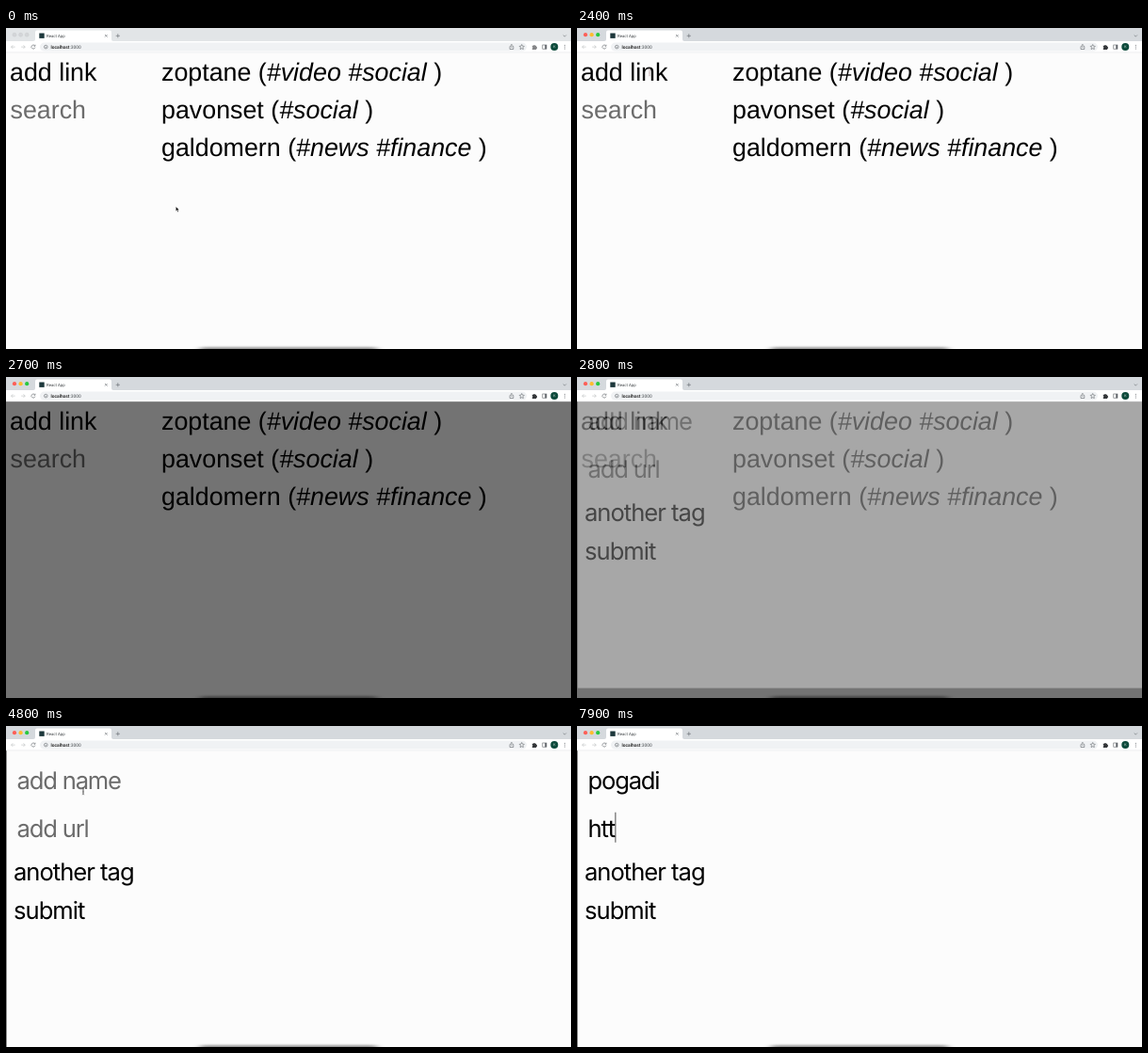
An HTML page for the animation above (8000 ms loop, 600 by 341 pixels).

```html
<!DOCTYPE html>
<html lang="en">
<head>
<meta charset="utf-8">
<title>Link list</title>
<style>
  html, body { margin: 0; height: 100%; overflow: hidden; background: #fcfcfc; }
  svg { display: block; width: 100%; height: 100%; text-rendering: geometricPrecision; }
  .page { font: 26.82px "Liberation Sans", Arial, sans-serif; }
  .form { font: 25.6px Inter, sans-serif; letter-spacing: -.046em; }
  .button { letter-spacing: -.039em; }
  .small { font: 4.3px Roboto, sans-serif; fill: #3c4043; }
  .hint { fill: #6c6c6c; }
  .line { fill: none; stroke: #5f6368; stroke-width: .6; }
  .it { font-style: italic; }
  .strip { fill: #d5d9dd; }
  .idle .strip { fill: #e2e5e7; }
  .idle .lights circle { fill: #d3d5d8; stroke: #c4c7ca; stroke-width: .3; }
  .idle .puzzle { opacity: .6; }
</style>
</head>
<body>
<svg id="stage" viewBox="0 0 600 341" preserveAspectRatio="none">
  <defs>
    <filter id="soft" x="-10%" y="-100%" width="120%" height="300%">
      <feGaussianBlur stdDeviation="4 1.3"/>
    </filter>
  </defs>

  <rect width="600" height="341" fill="#fcfcfc"/>
  <g class="page">
    <text x="4" y="56">add link</text>
    <text x="4.5" y="96" class="hint">search</text>
    <text x="165" y="56">zoptane (<tspan class="it">#video #social </tspan>)</text>
    <text x="165" y="96.1">pavonset (<tspan class="it">#social </tspan>)</text>
    <text x="165" y="136.2">galdomern (<tspan class="it">#news #finance </tspan>)</text>
  </g>

  <rect id="shade" y="26" width="600" height="315"/>
  <g id="modal" class="form">
    <rect x=".8" y="-20" width="600" height="361.5" fill="#fcfcfc"/>
    <text id="name" x="11.5" y="66.8"></text>
    <text id="url" x="11.5" y="117.6"></text>
    <text class="button" x="8" y="164">another tag</text>
    <text class="button" x="8" y="204.8">submit</text>
    <rect id="caret" width=".7" height="32"/>
  </g>

  <rect x="206" y="339" width="188" height="6" rx="3" opacity=".4" filter="url(#soft)"/>

  <g id="chrome">
    <rect class="strip" width="600" height="14"/>
    <path d="M29 14q2 0 2-2V4.500q0-2 2-2h77q2 0 2 2V12q0 2 2 2z" fill="#fff"/>
    <rect y="14" width="600" height="12" fill="#fff"/>
    <rect y="25.700" width="600" height=".5" fill="#dcdee1"/>
    <g class="lights">
      <circle cx="9" cy="7.200" r="2.100" fill="#fe5f57"/>
      <circle cx="15.600" cy="7.200" r="2.100" fill="#febc2e"/>
      <circle cx="22.200" cy="7.200" r="2.100" fill="#28c840"/>
    </g>
    <rect x="35.300" y="5.500" width="5.400" height="5.400" fill="#1d373b"/>
    <text class="small" x="43" y="9.900">React App</text>
    <path class="line" d="M105 7l2.600 2.600m0-2.600l-2.600 2.600M116.700 8.300h4.200m-2.100-2.100v4.200M591.700 7.500l1.600 1.600 1.600-1.600"/>
    <rect x="36" y="15.600" width="517" height="9" rx="4.500" fill="#f0f2f4"/>
    <path class="line" style="stroke:#b7babd" d="M9.600 20.100H5.600m1.700-1.800l-1.800 1.800 1.800 1.800M16.200 20.100h4m-1.700-1.800l1.800 1.800-1.800 1.800"/>
    <path class="line" d="M30.600 18.900a2 2 0 1 0 .3 1.700M31 17.700v1.500h-1.500"/>
    <circle class="line" cx="42.300" cy="20.100" r="1.800"/>
    <path class="line" d="M42.300 19.900v1.100"/>
    <text class="small" x="47.500" y="21.700" style="font-size:4.850px;font-weight:500;fill:#111">localhost<tspan fill="#686c70">:3000</tspan></text>
    <path class="line" d="M535.700 19.500h-.7v3h3.800v-3h-.7M536.900 21v-3.500m-1 1l1-1 1 1"/>
    <path class="line" d="M547.700 17.500l.8 1.700 1.800.2-1.300 1.300.3 1.900-1.600-.9-1.600.9.300-1.900-1.300-1.300 1.800-.2z"/>
    <path class="puzzle" fill="#333639" d="M558.800 18.800h1.300a.9.900 0 0 1 1.800 0h1.300v1.300a.9.900 0 0 1 0 1.800v1h-4.400v-1.200a.9.900 0 0 0 0-1.600z"/>
    <rect class="line" x="569.800" y="18" width="4.200" height="4.200"/>
    <path d="M572.300 18h1.700v4.200h-1.700z" fill="#5f6368"/>
    <circle cx="582.300" cy="20.100" r="4" fill="#0d4a3b"/>
    <text class="small" x="582.300" y="21.400" text-anchor="middle" style="font-size:3.600px;fill:#cfe0da">K</text>
    <g fill="#5f6368">
      <circle cx="593.300" cy="18.300" r=".5"/>
      <circle cx="593.300" cy="20.100" r=".5"/>
      <circle cx="593.300" cy="21.900" r=".5"/>
    </g>
  </g>

  <path id="arrow" d="M0 0v4.800l1.100-1 .8 1.800.9-.4-.8-1.700h1.500z" stroke="#fff" stroke-width=".35"/>
  <path id="beam" d="M-1.200-3.900q1.200 0 1.200 1v5.800q0 1-1.200 1M1.200-3.900q-1.200 0-1.200 1v5.800q0 1 1.200 1M-.7.900h1.400" fill="none" stroke="#555" stroke-width=".6"/>
</svg>

<script>
const $ = id => document.getElementById(id);
const set = (el, attrs) => { for (const k in attrs) el.setAttribute(k, attrs[k]); };
const show = (el, on) => { el.style.display = on ? '' : 'none'; };

const LOOP = 8000, STEP = 100;

// rows of [ms, ...values], interpolated linearly between rows
const mousePath = [
  [0, 180.4, 189.8], [100, 180.1, 189.6], [200, 180.1, 189.6], [300, 180.6, 190.3],
  [800, 180.6, 190.3], [1100, 117, 47.5], [1300, 117, 47.5], [1500, 76, 46.5],
  [2300, 76, 46.5], [2400, 77, 47], [3300, 77, 47], [3900, 79.5, 73],
  [4200, 82, 69], [6200, 82, 69], [6800, 80, 108]
];
const shadePath = [[2500, 0], [2600, .4], [2700, .54]];
const modalPath = [[2700, 0, -20], [2800, .38, -11], [2900, 1, -5.5], [3000, 1, 0]];

const nameKeys = [5200, 5400, 5500, 5600, 5800, 5900];
const urlKeys = [7400, 7700, 7900];
// [from, to, field] while the caret is lit
const caretOn = [[4300, 4800, 'name'], [5200, 6400, 'name'], [6800, 7300, 'url'], [7400, 8000, 'url']];
const mouseOff = [[2600, 2900], [5200, 6300], [7400, 8000]];

function at(rows, t) {
  const n = rows.findIndex(r => r[0] > t);
  if (n === 0) return rows[0].slice(1);
  if (n < 0) return rows[rows.length - 1].slice(1);
  const a = rows[n - 1], b = rows[n], p = (t - a[0]) / (b[0] - a[0]);
  return a.slice(1).map((v, i) => v + (b[i + 1] - v) * p);
}

const within = (spans, t) => spans.find(s => t >= s[0] && t < s[1]);

function type(el, text, keys, hint, t) {
  const typed = text.slice(0, keys.filter(k => k <= t).length);
  const value = typed || hint;
  if (el.textContent !== value) el.textContent = value;
  el.setAttribute('class', typed ? '' : 'hint');
  return typed;
}

function draw(t) {
  $('chrome').setAttribute('class', t < 600 ? 'idle' : '');
  set($('shade'), { opacity: at(shadePath, t)[0] });

  const [alpha, dy] = at(modalPath, t);
  set($('modal'), { opacity: alpha, transform: `translate(0 ${dy})` });

  const typed = {
    name: type($('name'), 'pogadi', nameKeys, 'add name', t),
    url: type($('url'), 'htt', urlKeys, 'add url', t)
  };
  const lit = within(caretOn, t);
  show($('caret'), lit);
  if (lit) {
    const field = lit[2];
    const w = typed[field] ? $(field).getComputedTextLength() + .8 : 0;
    set($('caret'), { x: 11.4 + w, y: field === 'name' ? 41 : 91.7 });
  }

  const [x, y] = at(mousePath, t), seen = !within(mouseOff, t);
  show($('arrow'), seen && t < 2400);
  show($('beam'), seen && t >= 2400);
  $('beam').style.stroke = t < 2600 ? '#c9b5b5' : '#555';
  for (const id of ['arrow', 'beam']) set($(id), { transform: `translate(${x} ${y})` });
}

const start = performance.now();
function tick() {
  const t = (performance.now() - start) % LOOP;
  draw(Math.floor(t / STEP) * STEP);
  requestAnimationFrame(tick);
}
tick();
</script>
</body>
</html>
```
